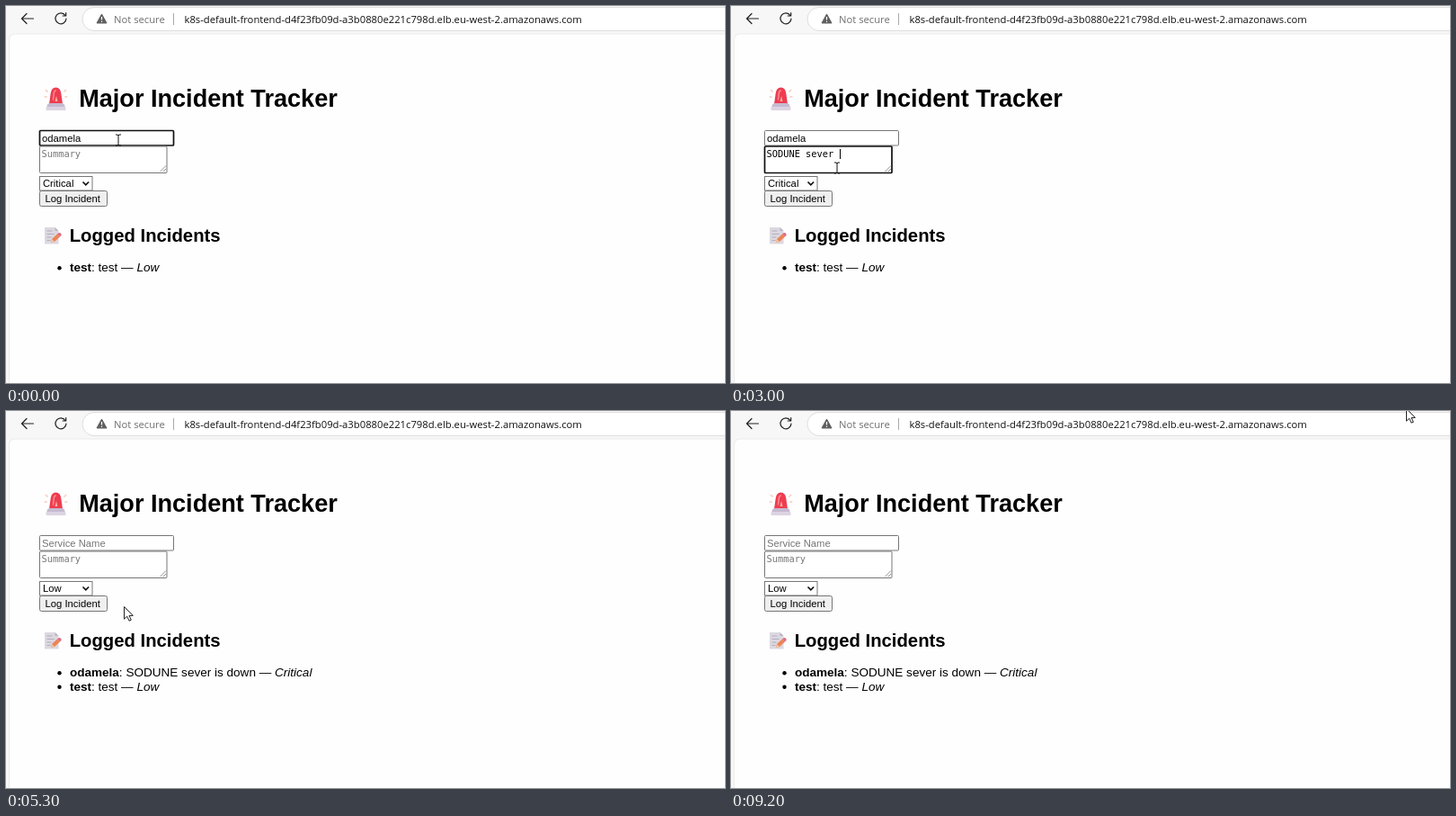
Write an HTML page that moves like this. It is 800 px wide and 419 px high and loops after 9300 ms.

```html
<!DOCTYPE html>
<html lang="en">
<head>
<meta charset="utf-8">
<title>Major Incident Tracker</title>
<style>
  html, body { margin: 0; width: 100%; height: 100%; overflow: hidden; background: #f7f7f7; }
  svg { display: block; }
  text { font: 11.25px "Liberation Sans", Arial, sans-serif; white-space: pre; }
  .bar { font-family: "Open Sans", "Noto Sans", sans-serif; }
  .h1 { font-size: 27.1px; font-weight: bold; }
  .h2 { font-size: 20.3px; font-weight: bold; }
  .item { font-size: 13.56px; }
  .mono { font: 10.35px "DejaVu Sans Mono", monospace; }
  .b { font-weight: bold; }
  .i { font-style: italic; }
  .icon { fill: none; stroke: #222; stroke-width: 1.2; stroke-linecap: round; stroke-linejoin: round; }
  .box { fill: #fff; stroke: #767676; }
  .focus { stroke: #101010; stroke-width: 1.7; }
</style>
</head>
<body>
<svg width="800" height="419" viewBox="0 0 800 419">
  <!-- browser bar -->
  <rect x="85" y="1.5" width="760" height="26" rx="13" fill="#fff" stroke="#dedede"/>
  <path class="icon" d="M30.5 14H17.500M23 8.500L17.500 14l5.500 5.500"/>
  <path class="icon" d="M66 10.500A6 6 0 1 0 67 14M66.700 7.500v3.500h-3.500"/>
  <path d="M106.500 9l5.500 10h-11z" fill="#5f5f5f" stroke="#5f5f5f" stroke-linejoin="round"/>
  <path d="M106.500 12v3.500m0 1.200v1.300" stroke="#fff" stroke-width="1.200"/>
  <text class="bar" x="120" y="18.500" fill="#6f6f6f">Not secure</text>
  <path d="M186.500 8v13" stroke="#aaa"/>
  <text class="bar" x="198.500" y="18.500" fill="#111">k8s-default-frontend-d4f23fb09d-a3b0880e221c798d.elb.eu-west-2.amazonaws.com</text>

  <!-- page -->
  <path d="M3.500 420V38q0-7 7-7H801V420z" fill="#fffeff" stroke="#ebebeb"/>
  <g>
    <path d="M46 95l-1.500-1.500M65 95l1.500-1.500M45 101h-1.500M66 101h1.500" stroke="#f6d8cc" stroke-width="2" stroke-linecap="round"/>
    <path d="M48 109l1.700-12q.800-6.500 5.800-6.500t5.800 6.500l1.700 12z" fill="#ee3d50"/>
    <path d="M52.500 104l.800-7q.400-3 2-3" fill="none" stroke="#ff8790" stroke-width="1.600" stroke-linecap="round"/>
    <path d="M56 100l1.500 6h-3z" fill="#ffb09b"/>
    <path d="M45.500 112q0-4 4-4h12q4 0 4 4v3.500h-20z" fill="#c6bad0"/>
    <rect x="44.500" y="112" width="22" height="4" rx="1" fill="#dcd4e2"/>
  </g>
  <text class="h1" x="81.200" y="112">Major Incident Tracker</text>

  <rect id="service" class="box" x="37.500" y="138.500" width="149" height="16.500" rx="1"/>
  <path id="squiggle" fill="none" stroke="#e0565a" stroke-width=".9"/>
  <text id="serviceText" x="40" y="150.500"></text>

  <rect id="summary" class="box" x="37.500" y="156" width="141.500" height="29.500" rx="1"/>
  <path d="M171.500 184l6.500-6.500M175 184l3-3" stroke="#777" stroke-width=".8"/>
  <text id="summaryText" class="mono" x="39.500" y="168.300"></text>
  <path id="caret" stroke="#000"/>

  <rect class="box" x="37.500" y="189.500" width="58.500" height="15.500"/>
  <text id="level" x="41" y="201"></text>
  <path d="M85.500 195.500l3.300 3.300 3.300-3.300" fill="none" stroke="#111" stroke-width="1.700"/>
  <rect id="button" class="box" x="37.500" y="205.500" width="75" height="17" rx="2"/>
  <text x="43.500" y="218">Log Incident</text>

  <g>
    <path d="M43 246h11.500l4 4v14.500h-15.500z" fill="#dcd8e0"/>
    <path d="M54.500 246v4h4z" fill="#bcb4c6"/>
    <path d="M45.500 250h6M45.500 253.500h8M45.500 257h5M45.500 260.500h4" stroke="#b3adbd"/>
    <path d="M50 263l1-4 6-5.500 3 3-6 5.500z" fill="#ec8456"/>
    <path d="M57 253.500l1.500-1.300q1.300-.600 2.300.400t.700 2.500l-1.500 1.400z" fill="#e06a80"/>
    <path d="M50 263l1-4 3 3z" fill="#efc8a6"/>
  </g>
  <text class="h2" x="70.700" y="262">Logged Incidents</text>

  <g id="newItem">
    <circle cx="59.500" cy="291.200" r="2.200"/>
    <text class="item" x="70.900" y="295.200"><tspan class="b">odamela</tspan>: SODUNE sever is down — <tspan class="i">Critical</tspan></text>
  </g>
  <g id="oldItem">
    <circle cx="59.500" cy="291.200" r="2.200"/>
    <text class="item" x="70.900" y="295.200"><tspan class="b">test</tspan>: test — <tspan class="i">Low</tspan></text>
  </g>

  <path id="beam" d="M-3-6h2l1 1 1-1h2M0-5V5M-3 6h2l1-1 1 1h2" fill="none" stroke="#111"/>
  <path id="arrow" d="M.5.500V14.200l3.200-3 2.300 5 2.300-1-2.300-4.800h4.300z" fill="#fff" stroke="#222" stroke-linejoin="round"/>
</svg>
<script>
const LOOP = 9300;
const SERVICE = "odamela", SUMMARY = "SODUNE sever is down";
const FOCUS_SUMMARY = 1500, TYPE_START = 2100, TYPE_END = 3600, SUBMIT = 4700;
const CHAR = 10.35 * 0.602;

// time, x, y of the pointer
const path = [
  [0, 125, 149], [300, 125, 149], [900, 118, 180], [3600, 118, 180],
  [4050, 88, 221], [4850, 88, 221], [5250, 131, 217], [5500, 131, 217],
  [6300, 267, 218], [8150, 267, 218], [8750, 761, 2], [9000, 751, -3], [LOOP, 751, -3]
];

const $ = id => document.getElementById(id);
const show = (id, on) => $(id).setAttribute("visibility", on ? "visible" : "hidden");

function field(id, value, placeholder) {
  $(id).textContent = value || placeholder;
  $(id).setAttribute("fill", value ? "#000" : "#757575");
}

function pointerAt(t) {
  const k = path.findIndex(p => p[0] > t);
  const [t0, x0, y0] = path[k - 1], [t1, x1, y1] = path[k];
  const u = (t - t0) / (t1 - t0), e = u * u * (3 - 2 * u);
  return [x0 + (x1 - x0) * e, y0 + (y1 - y0) * e];
}

function draw(t) {
  const sent = t >= SUBMIT, inService = t < FOCUS_SUMMARY;
  const typed = Math.max(0, Math.min(SUMMARY.length,
    Math.ceil((t - TYPE_START) / (TYPE_END - TYPE_START) * SUMMARY.length)));

  field("serviceText", sent ? "" : SERVICE, "Service Name");
  field("summaryText", sent ? "" : SUMMARY.slice(0, typed), "Summary");
  $("level").textContent = sent ? "Low" : "Critical";
  $("service").classList.toggle("focus", inService);
  $("summary").classList.toggle("focus", !inService && !sent);
  show("squiggle", inService && t >= 500);
  show("newItem", sent);
  $("oldItem").setAttribute("transform", `translate(0 ${sent ? 15.5 : 0})`);

  const typing = t >= TYPE_START && t < TYPE_END;
  const since = inService ? t + 700 : t - (t < TYPE_START ? FOCUS_SUMMARY : TYPE_END);
  show("caret", !sent && (typing || since % 1000 < 500));
  $("caret").setAttribute("d", inService ? "M84.5 141v11" : `M${40.5 + typed * CHAR} 159v11`);

  const [x, y] = pointerAt(t), overText = y < 187 && t < 4050;
  show("beam", overText);
  show("arrow", !overText);
  $(overText ? "beam" : "arrow").setAttribute("transform", `translate(${x} ${y})`);
  const hover = x > 37 && x < 113 && y > 205 && y < 223;
  $("button").style.fill = hover ? "#e2e2e2" : "#efefef";
}

$("squiggle").setAttribute("d", "M40 153.5" + "l1.500-1.800 1.500 1.800".repeat(15));

function frame(now) {
  draw(now % LOOP);
  requestAnimationFrame(frame);
}
draw(0);
requestAnimationFrame(frame);
</script>
</body>
</html>
```
